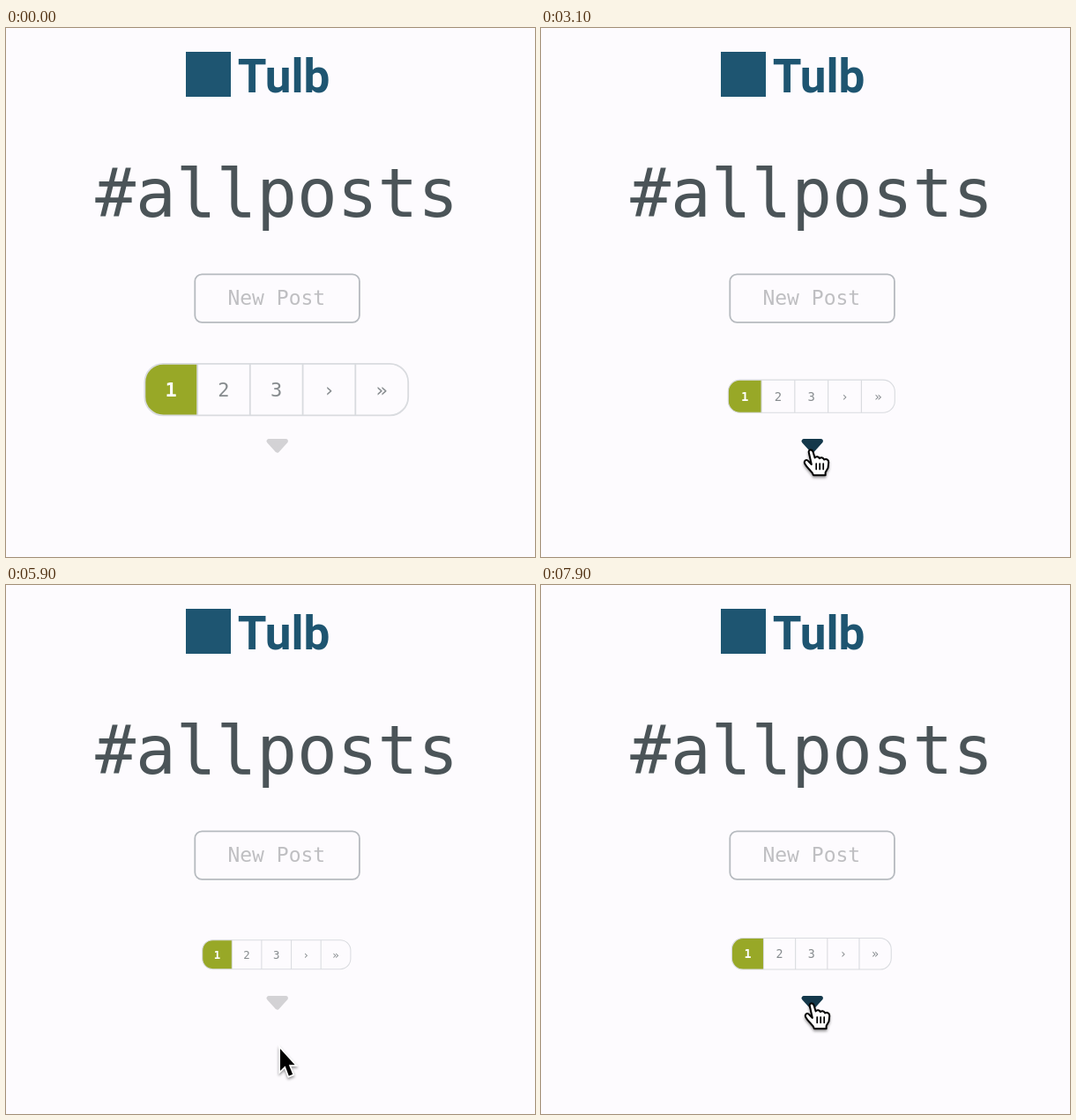
An HTML page that plays this animation: 600 by 600 pixels, repeating every 8 s.

```html
<!DOCTYPE html>
<html lang="en">
<head>
<meta charset="utf-8">
<title>Pagination hover</title>
<style>
  html, body { margin: 0; width: 100%; height: 100%; overflow: hidden; background: #fdfbfe; }
  svg { display: block; width: 100%; height: 100%; }
  text { font-family: "DejaVu Sans Mono", monospace; text-anchor: middle; }
  .brand { font: bold 53px Roboto, sans-serif; fill: #1e5571; }
  .title { font-size: 76px; fill: #4b5458; }
  .button { font-size: 23px; fill: #bfbfc2; }
  #pager text { font-size: 22px; fill: #868b8e; }
  #pager .current { font-weight: bold; fill: #fff; }
  .cursor { filter: drop-shadow(0 2px 1.5px rgba(0, 0, 0, .4)); }
</style>
</head>
<body>
<svg viewBox="0 0 600 600">
  <rect x="204" y="27" width="51" height="51" fill="#1e5571"/>
  <text class="brand" x="315" y="73">Tulb</text>
  <text class="title" x="307.1" y="214">#allposts</text>

  <rect x="214.3" y="279.3" width="186.6" height="54.6" rx="8" fill="none" stroke="#b6babf" stroke-width="1.8"/>
  <text class="button" x="306.8" y="314">New Post</text>

  <g id="pager">
    <path d="M-89.7 -50V8.6H-128.4A21 21 0 0 1 -149.4 -12.4V-29A21 21 0 0 1 -128.4 -50Z" fill="#98a827"/>
    <path d="M-89.7 -50V8.6M-30 -50V8.6M29.8 -50V8.6M89.5 -50V8.6" stroke="#d9dbdf" stroke-width="1.8"/>
    <rect x="-149.4" y="-50" width="298.8" height="58.6" rx="21" fill="none" stroke="#d9dbdf" stroke-width="1.8"/>
    <text class="current" x="-119.6" y="-12.8">1</text>
    <text x="-59.9" y="-12.8">2</text>
    <text x="-.1" y="-12.8">3</text>
    <text x="59.6" y="-12.8">›</text>
    <text x="119.4" y="-12.8">»</text>
  </g>

  <path id="caret" d="M298 468.5H317.4L307.7 479.2Z" stroke-width="5" stroke-linejoin="round"/>

  <g id="arrow" class="cursor">
    <path d="M1 2V27L6.6 21.6 10.8 32.8 15.2 31 10.8 20.2H17.6Z" stroke="#fff" stroke-width="3.4" paint-order="stroke"/>
  </g>
  <g id="hand" class="cursor" stroke="#000" stroke-width="2" stroke-linecap="round" stroke-linejoin="round">
    <path fill="#fff" d="M-2.2 3.5C-3 0 1.5 -.5 2.5 2.8L4.6 9.5C6 7.4 9 8 9.8 10.2 12 8.6 14.4 9.4 15 11.6 18 10.2 20.4 12 20.2 15L19.5 21 16.6 26V29.2H3C2 25-3 23-6.6 16.5-8.5 13-5 10.6-2.8 13.2L.8 17Z"/>
    <path fill="none" stroke-width="1.7" d="M6.2 16V22.5M10.2 16V22.5M14.2 16V22.5"/>
  </g>
</svg>
<script>
const LOOP = 8000, STEP = 100, SMALL = 0.25;
const HOVERS = [[2235, 5138], [7110, LOOP]];

// time, x, y of the pointer's hot spot
const POINTER = [
  [1600, 332, 602], [1800, 324, 560], [2100, 318, 522], [2250, 311, 492], [2400, 306, 478],
  [5050, 306, 478], [5130, 306, 488], [5200, 308, 501], [5300, 309, 512], [5500, 310, 524],
  [6900, 310, 524], [7100, 309, 498], [7300, 307, 474], [LOOP, 307, 474]
];

const [pager, caret, arrow, hand] =
  ["pager", "caret", "arrow", "hand"].map(id => document.getElementById(id));
const mix = (a, b, k) => a + (b - a) * k;

// cubic-bezier(.25, .1, .25, 1)
function ease(x) {
  if (x <= 0) return 0;
  if (x >= 1) return 1;
  const bezier = (a, b, u) => 3 * a * u * (1 - u) ** 2 + 3 * b * u * u * (1 - u) + u ** 3;
  let low = 0, high = 1;
  for (let i = 0; i < 24; i++) {
    const mid = (low + high) / 2;
    if (bezier(0.25, 0.25, mid) < x) low = mid; else high = mid;
  }
  return bezier(0.1, 1, low);
}

const grow = t => mix(SMALL, 1, ease((t - 5138) / 3000));

function pagerScale(t) {
  const [first, second] = HOVERS;
  if (t < first[1]) return mix(1, SMALL, ease((t - first[0]) / 3000));
  if (t < second[0]) return grow(t);
  // an interrupted transition reverses in a shortened time
  return mix(grow(second[0]), SMALL, ease((t - second[0]) / 2763));
}

function pointerAt(t) {
  const next = POINTER.findIndex(key => key[0] > t);
  const a = POINTER[next - 1], b = POINTER[next];
  const k = (t - a[0]) / (b[0] - a[0]);
  return [mix(a[1], b[1], k), mix(a[2], b[2], k)];
}

function draw(now) {
  const t = Math.floor((now % LOOP) / STEP) * STEP;
  const hover = HOVERS.some(([from, to]) => t >= from && t < to);
  const visible = t >= POINTER[0][0];
  const color = hover ? "#14384b" : "#d3d2d5";

  pager.setAttribute("transform", `translate(306.8 430.8) scale(${pagerScale(t)})`);
  caret.setAttribute("fill", color);
  caret.setAttribute("stroke", color);
  arrow.style.display = visible && !hover ? "" : "none";
  hand.style.display = visible && hover ? "" : "none";
  if (visible) {
    const place = `translate(${pointerAt(t)})`;
    arrow.setAttribute("transform", place);
    hand.setAttribute("transform", place);
  }
}

const start = performance.now();
(function frame() {
  draw(performance.now() - start);
  requestAnimationFrame(frame);
})();
</script>
</body>
</html>
```
